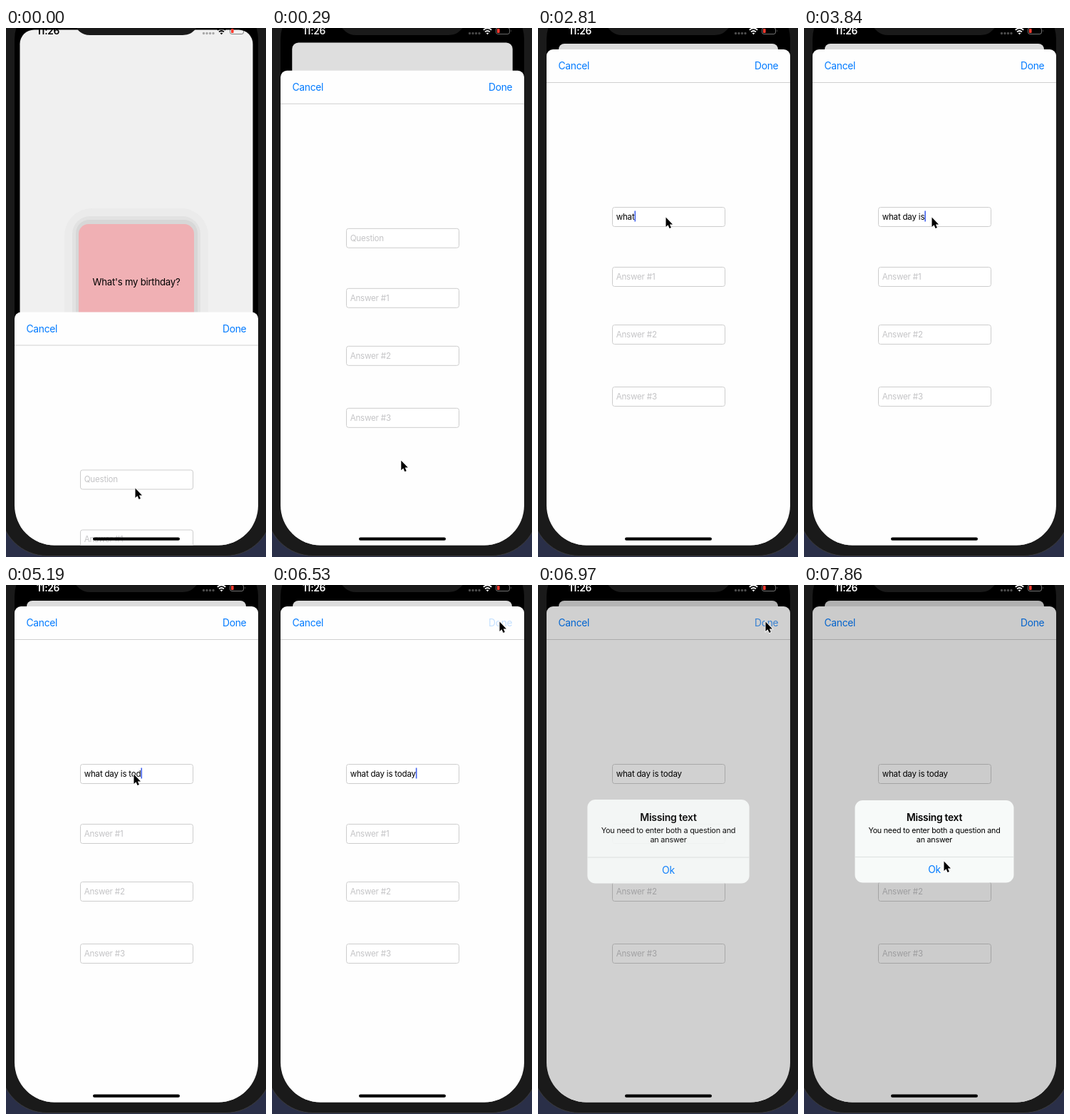
These frames come from a looping animation (365x742 px, 8 s). An HTML page:

```html
<!DOCTYPE html>
<html lang="en">
<head>
<meta charset="utf-8">
<title>Flashcard form</title>
<style>
html, body { margin: 0; width: 365px; height: 742px; overflow: hidden; background: #2a2f48; }
svg { display: block; }
text { font-family: Inter, "Liberation Sans", sans-serif; letter-spacing: -.019em; white-space: pre; }
.bar { font-size: 13.8px; fill: #007aff; }
.field rect { fill: #fff; stroke: #cdcdcd; }
.field text { font-size: 11.6px; fill: #c4c4c6; }
.mid { text-anchor: middle; }
</style>
</head>
<body>
<svg width="365" height="742" viewBox="0 0 365 742">
  <defs>
    <clipPath id="screen"><rect x="12" y="-40" width="342" height="765.5" rx="56"/></clipPath>
  </defs>
  <rect x="-8" y="-80" width="382" height="820.5" rx="66" fill="#1a1a1a" stroke="#3c3c3f"/>
  <g clip-path="url(#screen)">
    <rect width="365" height="742"/>
    <rect id="back" height="760"/>
    <g id="card">
      <rect x="82" y="253" width="202" height="230" rx="38" fill="#ebebeb"/>
      <rect x="93" y="264" width="180" height="210" rx="25" fill="#e2e2e2"/>
      <rect x="98" y="269" width="171" height="200" rx="19" fill="#d7d7d7"/>
      <rect x="102" y="275" width="162" height="180" rx="14" fill="#f0b0b4"/>
      <text class="mid" x="183" y="361" font-size="13.2">What's my birthday?</text>
    </g>
    <g id="sheet">
      <rect x="12" y="30" width="342" height="760" rx="9" fill="#fefefe"/>
      <path d="M12 76.5H354" stroke="#d0d0d0"/>
      <text class="bar" x="28.5" y="58.2">Cancel</text>
      <text class="bar" id="done" x="304" y="58.2">Done</text>
      <g id="fields"></g>
      <rect id="caret" y="256.5" width="1.6" height="15" fill="#4262ee"/>
    </g>
    <rect id="dim" y="22" width="365" height="720"/>
    <rect x="122" y="714.6" width="122" height="4.2" rx="2.1"/>
    <g id="alert">
      <rect x="71.5" y="302" width="223" height="115.5" rx="11" fill="#f7faf9"/>
      <path d="M71.5 381.5H294.5" stroke="#dde1e0"/>
      <g class="mid">
        <text x="183" y="331.5" font-size="13.8" font-weight="600">Missing text</text>
        <text x="183" y="348" font-size="10.7">You need to enter both a question and</text>
        <text x="183" y="361" font-size="10.7">an answer</text>
        <text class="bar" x="183" y="404.5">Ok</text>
      </g>
    </g>
  </g>
  <path d="M96 -1C101 0 103 10 118 10H248C263 10 265 0 270 -1z" fill="#1a1a1a"/>
  <g id="status">
    <text x="43" y="9" font-size="13.8" font-weight="600">11:26</text>
    <g fill="none" stroke="currentColor">
      <path d="M277.5 7.5H292" stroke-width="3.4" stroke-linecap="round" stroke-dasharray="0 4.5" opacity=".3"/>
      <path d="M296.8 2.8Q302.5 -2 308.2 2.8M299 5.4Q302.5 2.6 306 5.4" stroke-width="1.8"/>
      <rect x="314.5" y="-.5" width="19" height="9" rx="2.6" opacity=".45"/>
    </g>
    <path d="M300.6 7.2Q302.5 5.8 304.4 7.2L302.5 9.3z"/>
    <path d="M335 2.5q1.6 1.5 0 3z" opacity=".45"/>
    <rect x="316" y="1" width="3.6" height="6" rx="1" fill="#ff3b30"/>
  </g>
  <path id="cursor" d="M0 0V13.6L3 10.8L5.1 15.6L7.4 14.6L5.4 9.9H9.5z" stroke="#fff" stroke-width="1.6" paint-order="stroke"/>
</svg>
<script>
const $ = id => document.getElementById(id);
const set = (id, attrs) => { for (const k in attrs) $(id).setAttribute(k, attrs[k]); };
const mix = (a, b, u) => a + (b - a) * u;
const gray = v => `rgb(${v},${v},${v})`;
const ramp = (t, from, to) => Math.min(1, Math.max(0, (t - from) / (to - from)));
const ease = (t, from, to) => { const u = ramp(t, from, to); return u * u * (3 - 2 * u); };

const LOOP = 8000;
const TICK = 148.3;
const PRESS = 6500, ALERT = 6800;

// Bursts of typing: text, first and last moment
const BURSTS = [['what', 2220, 2810], [' day', 2810, 3260], [' is ', 3400, 3840],
  ['tod', 3840, 4740], ['ay', 5200, 5330]];
// Pointer moves: start, end, x, y
const MOVES = [[150, 890, 179.5, 265.5], [5630, 6400, 319.5, 51.5], [7120, 7860, 196.5, 387.5]];

$('fields').innerHTML = ['Question', 'Answer #1', 'Answer #2', 'Answer #3'].map((label, i) => {
  const y = [251, 335, 416, 503][i];
  return `<g class="field"><rect x="104.5" y="${y + .5}" width="158" height="27" rx="3"/>
    <text x="109.7" y="${y + 17.7}">${label}</text></g>`;
}).join('');
const input = document.querySelector('.field text');

function drawSheet(t) {
  const u = 1 - Math.exp(-t / 118);
  const inset = mix(19.5, 29, u);
  set('back', { x: inset, y: mix(2.5, 22, u), width: 366 - 2 * inset, rx: mix(20, 8, u), fill: gray(mix(240, 220, u)) });
  set('card', { opacity: t ? 0 : 1 });
  set('sheet', { transform: `translate(0 ${mix(368.5, 0, u)})` });
  const ink = gray(Math.round(255 * u));
  set('status', { fill: ink, color: ink });
}

function drawInput(t) {
  const typed = BURSTS.map(([text, from, to]) =>
    text.slice(0, Math.round(text.length * ramp(t, from, to)))).join('');
  input.textContent = typed || 'Question';
  input.style.fill = typed ? '#000' : '';
  const focused = t > 1320 && t < ALERT;
  set('caret', {
    x: 109.7 + (typed ? input.getComputedTextLength() : 0),
    opacity: focused ? (typed ? 1 : 1 - ramp(t, 1800, 2060)) : 0
  });
}

function drawAlert(t) {
  const p = t < ALERT ? 0 : 1 - .6 * Math.exp((ALERT - t) / 90);
  const scale = 1 + .21 * (1 - p);
  set('alert', { opacity: p, transform: `translate(183 359.7) scale(${scale}) translate(-183 -359.7)` });
  set('dim', { opacity: .2 * p });
  set('done', { opacity: t < PRESS ? 1 : mix(.22, 1, ease(t, PRESS, 7270)) });
}

function drawCursor(t) {
  let x = 181.5, y = 645.5;
  for (const [from, to, toX, toY] of MOVES) {
    const u = ease(t, from, to);
    x = mix(x, toX, u);
    y = mix(y, toY, u);
  }
  set('cursor', { transform: `translate(${x} ${y})` });
}

const start = performance.now();
function frame() {
  const now = (performance.now() - start) % LOOP;
  const t = Math.floor((now + 12) / TICK) * TICK;
  for (const part of [drawSheet, drawInput, drawAlert, drawCursor]) part(t);
  requestAnimationFrame(frame);
}
frame();
</script>
</body>
</html>
```
